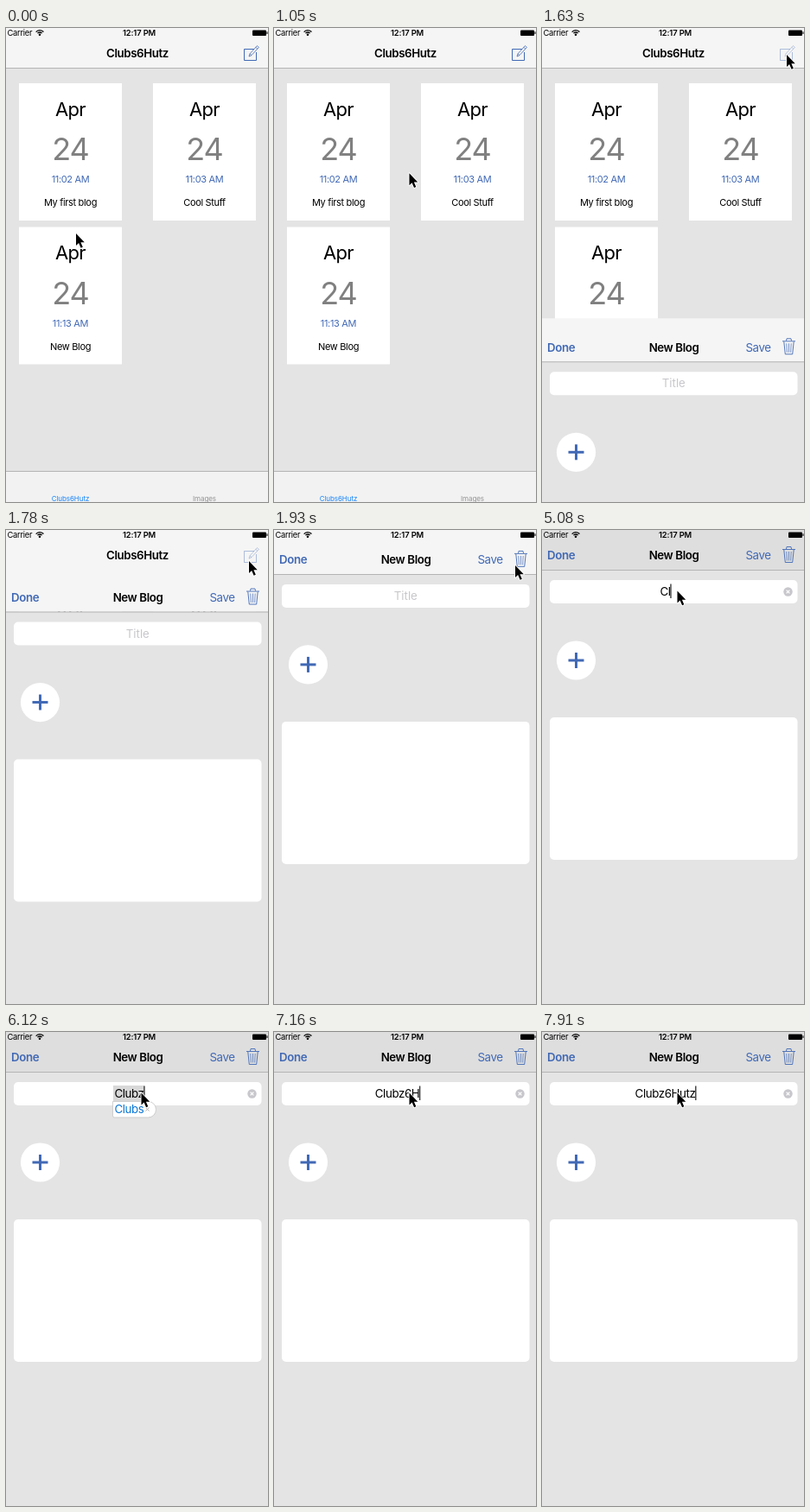
Write an HTML page with a canvas that moves like this. It is 303 by 549 pixels and loops after 8 s.

```html
<!DOCTYPE html>
<html lang="en">
<head>
<meta charset="utf-8">
<title>Blog app</title>
<style>
  html, body { margin: 0; width: 100%; height: 100%; overflow: hidden; background: #e4e4e4; }
  canvas { display: block; width: 303px; height: 549px; }
</style>
</head>
<body>
<canvas id="stage"></canvas>
<script>
const W = 303, H = 549, LOOP = 8000, TICK = 149.2;
const BLUE = '#4169b5', PAGE = '#e4e4e4', LIGHT_BAR = '#f5f5f5', GREY_BAR = '#dedede';
const APP = 'Clubs6Hutz', TITLE = 'Clubz6Hutz';

const PRESS = 10, SETTLED = 14, FOCUS = 19, FIRST_KEY = 27;
const WORD = 34, SUGGEST = 39, ACCEPT = 44;

const canvas = document.getElementById('stage');
const ctx = canvas.getContext('2d');
const dpr = window.devicePixelRatio || 1;
canvas.width = W * dpr;
canvas.height = H * dpr;

const clamp = v => Math.min(1, Math.max(0, v));
const smooth = v => v * v * (3 - 2 * v);

// Critically damped spring that brings the sheet up from below.
function sheetOffset(t) {
  const s = Math.max(0, 18.26 * (t - 1555.5) / 1000);
  return H * (1 + s) * Math.exp(-s);
}

function pointerAt(t) {
  let x = 81, y = 238;
  const glide = (toX, toY, from, to) => {
    const p = smooth(clamp((t - from) / (to - from)));
    x += (toX - x) * p;
    y += (toY - y) * p;
  };
  glide(105, 224, 400, 595);
  glide(283, 31, 800, 1450);
  glide(279, 41, 1630, 1925);
  glide(156.5, 70.5, 1925, 2370);
  return [x, y];
}

// Letters typed so far in a burst of `count` keys spread over `span` ticks.
function burst(tick, start, span, count, power) {
  let n = 0;
  while (n < count && tick >= Math.round(start + span * (n / (count - 1)) ** power)) n++;
  return n;
}

function typedAt(tick) {
  const n = (tick >= FIRST_KEY ? 1 : 0) + burst(tick, WORD, 4, 4, 1) + burst(tick, ACCEPT, 9, 5, 0.6);
  return TITLE.slice(0, n);
}

function caretAlpha(tick) {
  if (tick < FOCUS) return 0;
  if (tick >= WORD) return 1;
  const phase = (tick - FOCUS + 0.5) % 7.5;
  return phase < 3.25 ? 1 : phase < 4.25 ? 0.4 : 0;
}

function setFont(size, weight = 400, track = -0.03) {
  ctx.font = `${weight} ${size}px Inter, "Open Sans", sans-serif`;
  ctx.letterSpacing = `${size * track}px`;
}

function text(str, x, cy, size, { color = '#000', weight = 400, align = 'center', track } = {}) {
  setFont(size, weight, track);
  ctx.textAlign = align;
  ctx.fillStyle = color;
  ctx.fillText(str, x, cy + size * 0.364);
}

function rect(x, y, w, h, color, r = 0) {
  ctx.fillStyle = color;
  ctx.beginPath();
  ctx.roundRect(x, y, w, h, r);
  ctx.fill();
}

function disc(x, y, r, color) {
  ctx.fillStyle = color;
  ctx.beginPath();
  ctx.arc(x, y, r, 0, Math.PI * 2);
  ctx.fill();
}

function stroke(path, color, width) {
  ctx.strokeStyle = color;
  ctx.lineWidth = width;
  ctx.stroke(new Path2D(path));
}

function cross(x, y, r, color, width) {
  stroke(`M${x - r} ${y - r}l${2 * r} ${2 * r}m0 ${-2 * r}l${-2 * r} ${2 * r}`, color, width);
}

function card(x, y, time, name) {
  const cx = x + 59.5;
  rect(x, y, 119, 159, '#fff');
  text('Apr', cx, y + 29.7, 22);
  text('24', cx, y + 76, 36, { color: '#808080' });
  text(time, cx, y + 111, 11, { color: BLUE });
  text(name, cx, y + 138, 11);
}

function composeIcon() {
  stroke('M287 24.5H275.5V37.5H289.5V28', BLUE, 1);
  stroke('M281 33l1-3.2l8.4-9.2l2 1.8l-8.4 9.2zM282 29.8l2 1.8M288.8 22.4l2 1.8', BLUE, 0.8);
}

function trashIcon() {
  stroke('M278 22.5h15M282.5 22l.5-2.5h5l.5 2.5M279.8 23l1.5 14.5h8.4l1.5-14.5', BLUE, 0.9);
  for (const i of [-1, 0, 1]) stroke(`M${285.5 + 2.7 * i} 25L${285.5 + 2.1 * i} 35.5`, BLUE, 0.7);
}

function statusBar() {
  text('Carrier', 1.5, 5.8, 9.4, { align: 'left' });
  text('12:17 PM', 154, 5.8, 9.4, { weight: 600, track: -0.015 });
  ctx.lineWidth = 1.3;
  ctx.strokeStyle = '#000';
  for (const r of [3.4, 5.8]) {
    ctx.beginPath();
    ctx.arc(39, 8.4, r, -Math.PI * 0.77, -Math.PI * 0.23);
    ctx.stroke();
  }
  disc(39, 7.8, 1.3, '#000');
  rect(285, 2.5, 16, 6.5, '#000', 1);
  rect(301.5, 4.3, 1, 2.8, '#000');
}

function listScreen(tick) {
  rect(0, 0, W, H, PAGE);
  card(15, 64, '11:02 AM', 'My first blog');
  card(170, 64, '11:03 AM', 'Cool Stuff');
  card(15, 230.5, '11:13 AM', 'New Blog');
  rect(0, 0, W, 46, LIGHT_BAR);
  rect(0, 46, W, 1, '#b4b4b4');
  text(APP, 152, 29.5, 13.3, { weight: 600 });
  ctx.globalAlpha = tick >= PRESS ? 0.4 : 1;
  composeIcon();
  ctx.globalAlpha = 1;
  rect(0, 513, W, 36, '#f2f2f2');
  rect(0, 513, W, 1, '#b4b4b4');
  text(APP, 74.5, 545, 8, { color: '#1583fb', track: -0.01 });
  text('Images', 229.5, 545, 8, { color: '#929292', track: -0.01 });
}

// Fades and grows in over two ticks, and leaves the same way.
function suggestion(left, width, tick) {
  const shown = clamp(Math.min((tick - SUGGEST + 1) / 2, (ACCEPT - tick) / 2));
  const inset = 3 * (1 - shown);
  ctx.globalAlpha = shown;
  rect(left - 1.5, 62, width + 2, 18, '#d8d8d8');
  rect(left - 2 + inset, 80.5, 50 - inset * 2, 18.5, '#fff', [0, 9, 9, 2]);
  ctx.strokeStyle = '#c4c4c4';
  ctx.lineWidth = 0.8;
  ctx.stroke();
  text('Clubs', left, 89.5, 13.3, { color: '#0b76d6', align: 'left' });
  cross(left + 38, 89.5, 2, '#b0b0b0', 1);
  ctx.globalAlpha = 1;
}

function titleField(tick) {
  rect(9, 58, 286.5, 27, '#fff', 5);
  const typed = typedAt(tick);
  let caretX = 138.2;
  if (typed) {
    setFont(13.3);
    const width = ctx.measureText(typed).width, left = 142.5 - width / 2;
    if (tick >= SUGGEST && tick < ACCEPT) suggestion(left, width, tick);
    text(typed, left, 71.3, 13.3, { align: 'left' });
    caretX = left + width - 0.3;
    disc(284.5, 71.5, 5.2, '#c7c7cc');
    cross(284.5, 71.5, 1.9, '#fff', 1.2);
  } else {
    text('Title', 152.3, 71.3, 13.3, { color: '#c8c8cc', track: 0 });
  }
  ctx.globalAlpha = caretAlpha(tick);
  rect(caretX, 62.5, 1.4, 16.5, '#3a3a3a');
  ctx.globalAlpha = 1;
}

function sheet(tick, t) {
  ctx.save();
  ctx.translate(0, sheetOffset(t));
  rect(0, 46, W, H, PAGE);
  rect(0, -4, W, 50, tick < SETTLED ? LIGHT_BAR : GREY_BAR);
  rect(0, 46, W, 1, '#b4b4b4');
  text('Done', 6, 29.5, 13.3, { color: BLUE, weight: 600, align: 'left' });
  text('New Blog', 152.5, 29.5, 13.3, { weight: 600 });
  text('Save', 250, 29.5, 13.3, { color: BLUE });
  trashIcon();
  titleField(tick);
  disc(39.5, 151, 22.6, '#fff');
  rect(30.5, 149.5, 18, 3, BLUE);
  rect(38, 142, 3, 18, BLUE);
  rect(9, 217, 286.5, 165, '#fff', 5);
  ctx.restore();
}

function pointer([x, y]) {
  ctx.save();
  ctx.translate(x, y);
  const arrow = new Path2D('M0 0V14l3.1-2.9l2.5 5.7l2.2-1l-2.4-5.5h4.4z');
  ctx.lineJoin = 'round';
  ctx.strokeStyle = '#fff';
  ctx.lineWidth = 1.8;
  ctx.stroke(arrow);
  ctx.fillStyle = '#000';
  ctx.fill(arrow);
  ctx.restore();
}

function draw(now) {
  const tick = Math.floor((now % LOOP) / TICK + 0.09);
  const t = (tick - 0.09) * TICK;
  ctx.setTransform(dpr, 0, 0, dpr, 0, 0);
  if (tick < SETTLED) listScreen(tick);
  if (tick > PRESS) sheet(tick, t);
  statusBar();
  pointer(pointerAt(t));
}

let start;
function frame(now) {
  start ??= now;
  draw(Math.max(0, now - start));
  requestAnimationFrame(frame);
}
draw(0);
requestAnimationFrame(frame);
</script>
</body>
</html>
```
